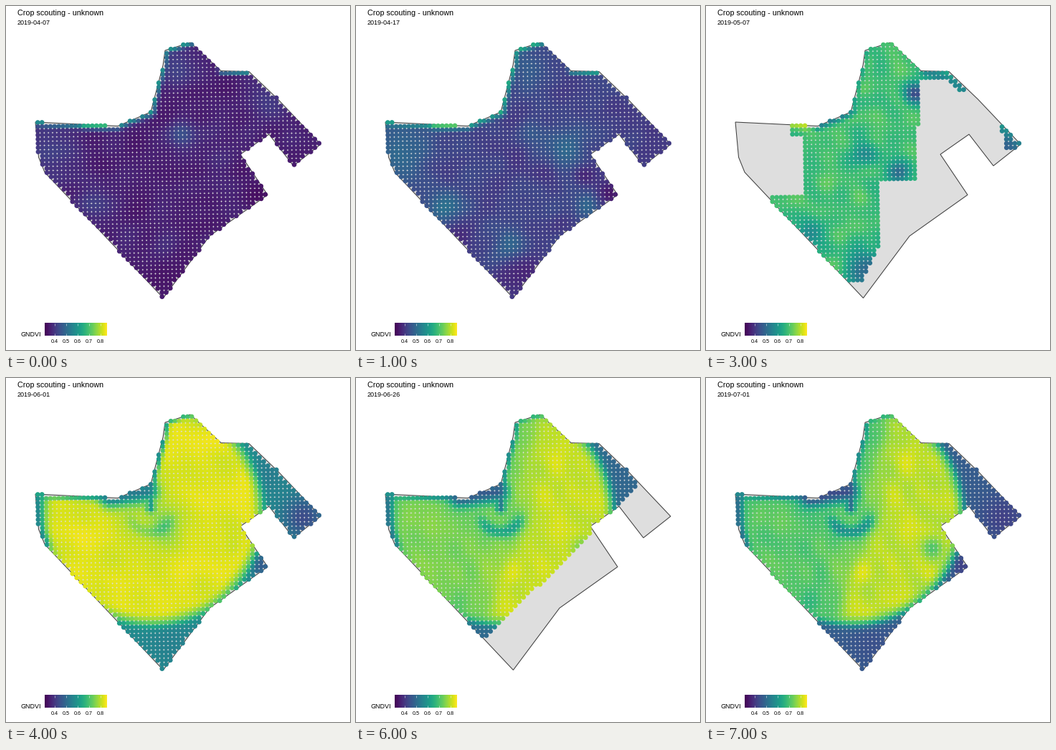
These frames come from a looping animation (480 px wide and 480 px high, 8000 ms). A matplotlib script:

```python
import numpy as np
import matplotlib.pyplot as plt
from matplotlib.animation import FuncAnimation
from matplotlib.path import Path

SIZE, DPI = 480, 80
PT = 72 / DPI
VMIN, VMAX = 0.316, 0.853
STEP, TILT = 5.85, 0.0155

FIELD = [(41, 162), (156, 167.5), (202, 148), (219, 83), (222, 62), (257, 51),
         (300, 90.5), (339, 91.5), (379.6, 130.3), (439, 193), (401, 223),
         (367, 179), (327, 207), (365, 263.5), (284, 321), (219.4, 407.5),
         (54, 232), (45.5, 211)]
NORTHWEST, LOBE, NORTHEAST = FIELD[:3], FIELD[2:6], FIELD[6:8]
WEST = [FIELD[0], FIELD[-1], FIELD[-2]]

# Spots of the field that stand out: x, y, radius.
PLACES = {
    "west": (60, 205, 42), "southwest": (122, 280, 24), "rim": (142, 320, 20),
    "south": (215, 335, 24), "tip": (232, 372, 32), "center": (222, 207, 20),
    "pond": (245, 180, 18), "ridge": (292, 200, 30), "corner": (415, 195, 30),
    "bend": (355, 260, 18), "pocket": (317, 236, 14), "lobe": (238, 85, 24),
    "northeast": (365, 135, 25), "dent": (255, 302, 15), "mouth": (292, 122, 15),
    "bay": (268, 233, 16), "bank": (322, 280, 17), "hill": (212, 274, 17),
}


def sample_points():
    """Slightly rotated square grid clipped to the field."""
    i, j = np.meshgrid(np.arange(-2, 72), np.arange(-22, 46))
    x = 44.3 + STEP * (i + TILT * j)
    y = 162.55 + STEP * (j - TILT * i)
    pts = np.column_stack([x.ravel(), y.ravel()])
    return pts[Path(FIELD).contains_points(pts)]


PTS = sample_points()
X, Y = PTS.T


def distance(line):
    best = np.full(len(PTS), np.inf)
    for a, b in zip(np.array(line[:-1], float), np.array(line[1:], float)):
        t = np.clip((PTS - a) @ (b - a) / ((b - a) @ (b - a)), 0, 1)
        best = np.minimum(best, np.hypot(*(PTS - a - t[:, None] * (b - a)).T))
    return best


def near(line, width):
    """1 on the polyline, fading to 0 away from it."""
    return np.exp(-(distance(line) / width) ** 2)


def spots(**amounts):
    total = np.zeros(len(PTS))
    for name, amount in amounts.items():
        x, y, r = PLACES[name]
        total += amount * np.exp(-((X - x) ** 2 + (Y - y) ** 2) / r ** 2)
    return total


def texture(seed, amount):
    """Smooth random mottling from a few waves."""
    rng = np.random.default_rng(seed)
    total = np.zeros(len(PTS))
    for angle, length, phase in rng.uniform((0, 30, 0), (np.pi, 90, 6.28), (12, 3)):
        along = X * np.cos(angle) + Y * np.sin(angle)
        total += np.cos(2 * np.pi * along / length + phase)
    return amount * total / np.sqrt(6)


def blend(v, target, k):
    return v + (target - v) * k


def sigmoid(u):
    return 1 / (1 + np.exp(-u))


# The irrigated circle, a rim inside it and the arc at its hub.
RADIUS = np.hypot(X - 204, Y - 190)
CIRCLE = sigmoid((155 - RADIUS) / 2.6)
RIM = 0.55 * np.exp(-((RADIUS - 151) / 8) ** 2)
ARC = np.exp(-((np.hypot(X - 202, Y - 187) - 28) / 8) ** 2) * sigmoid((Y - 196) / 4)
NOTCH = np.maximum(near([(146, 166), (198, 158)], 14),
                   0.7 * near([(202, 150), (202, 182)], 6))
GLOW = near([(110, 166), (138, 167)], 6)


def edges(v, northwest, lobe, northeast):
    v = blend(v, northwest, near(NORTHWEST, 5.5)) + 0.1 * GLOW
    v = blend(v, lobe, near(LOBE, 5))
    return blend(v, northeast, near(NORTHEAST, 4))


def early_april():
    v = 0.362 + texture(1, 0.006) + spots(
        west=0.055, southwest=0.055, pond=0.08, lobe=0.06, northeast=0.05,
        south=0.025, ridge=0.02, tip=-0.025, bend=-0.02)
    return edges(v, 0.57, 0.59, 0.62)


def late_april():
    v = 0.485 + texture(2, 0.012) + spots(
        west=0.1, southwest=0.11, south=0.11, ridge=0.11, bank=0.13, lobe=0.06,
        center=-0.07, pocket=-0.1, bend=-0.13, tip=-0.08, bay=-0.05,
        northeast=-0.06, corner=-0.05, rim=-0.07)
    return edges(v, 0.65, 0.69, 0.71)


def early_may():
    v = 0.69 + texture(3, 0.014) + spots(
        mouth=-0.24, bay=-0.2, tip=-0.22, rim=-0.15, center=-0.1, corner=-0.22)
    v = blend(v, 0.55, near(NORTHWEST[1:], 6)) + 0.1 * GLOW
    v = blend(v, 0.6, 0.7 * near(LOBE[:3], 5))
    return blend(v, 0.56, near([(310, 92), (360, 115)], 10))


def watered(crop, bare, west, northwest, lobe, notch):
    v = blend(bare, blend(crop, 0.71, RIM), CIRCLE)
    v = blend(v, west, near(WEST, 6))
    v = blend(v, northwest, near(NORTHWEST[:2], 5.5))
    v = blend(v, lobe, near(LOBE[:3], 5.5))
    v = blend(v, lobe + 0.08, 0.9 * near(LOBE[2:], 4))
    return blend(v, notch, NOTCH)


def early_june():
    crop = 0.828 + texture(4, 0.006) - 0.05 * ARC + spots(center=-0.06, pocket=-0.02)
    crop -= 0.04 * np.exp(-((X - 200) ** 2 + (Y - 195) ** 2) / 50 ** 2)
    bare = 0.57 + spots(corner=-0.13, bend=-0.1, northeast=-0.03, tip=-0.02)
    return watered(crop, bare, 0.57, 0.63, 0.58, 0.54)


def mid_june():
    crop = 0.775 + texture(5, 0.006) + spots(
        dent=-0.22, pocket=-0.02, lobe=-0.08, south=-0.02)
    bare = 0.585 + spots(corner=-0.13, bend=-0.14, tip=-0.03)
    return blend(bare, blend(crop, 0.71, RIM), CIRCLE)


def early_july():
    crop = 0.71 + 0.09 * sigmoid((X - 222 - 0.25 * (200 - Y)) / 10)
    crop += texture(6, 0.01) - 0.13 * ARC + spots(
        hill=0.06, pocket=-0.08, center=-0.05, rim=-0.04, south=0.02)
    bare = 0.47 + spots(corner=-0.05, bend=-0.05, tip=-0.02)
    return watered(crop, bare, 0.52, 0.57, 0.58, 0.44)


def may_clear():
    left = np.where(Y < 182, 117, np.where(Y < 262, 136, 0))
    right = np.where(Y < 243, 296, 243 - 0.5 * np.clip(Y - 335, 0, None))
    body = (X > left) & (X < right) & (Y < 387)
    strip = distance([(300, 94), (338, 95), (359, 114)]) < 7
    corner = distance([(419, 172), (426, 196), (437, 191)]) < 7
    return body | strip | corner


def june_clear():
    left = 241 - 0.75 * np.clip(Y - 228, 0, None)
    top = 145 + 0.53 * np.clip(X - 262, 0, None)
    body = ((X > left) & (Y > top)) | (Y > 304)
    trail = distance([(222, 66), (237, 64), (248, 88)]) < 5
    corner = (X > 373) & (Y > np.where(X > 416, 172, 186))
    return body | trail | corner


CLEAR = np.ones(len(PTS), bool)
SCENES = [
    ("2019-04-07", early_april(), CLEAR),
    ("2019-04-17", blend(early_april(), late_april(), 0.5), CLEAR),
    ("2019-04-27", late_april(), CLEAR),
    ("2019-05-07", early_may(), may_clear()),
    ("2019-06-01", early_june(), CLEAR),
    ("2019-06-16", mid_june(), june_clear()),
    ("2019-06-26", blend(early_june(), early_july(), 0.7), X + Y < 545),
    ("2019-07-01", early_july(), CLEAR),
]

plt.rcParams["font.family"] = "Liberation Sans"
fig = plt.figure(figsize=(SIZE / DPI, SIZE / DPI), dpi=DPI, facecolor="white")
ax = fig.add_axes([0, 0, 1, 1])


def label(x, y, text, px, **kw):
    return ax.text(x, y, text, fontsize=px * PT, va="baseline", color="black", **kw)


ax.add_patch(plt.Polygon(FIELD, facecolor="#dedede", edgecolor="#404040",
                         linewidth=1.05 * PT, zorder=1))
dots = ax.scatter(X, Y, c=SCENES[0][1], s=(6.7 * PT) ** 2, linewidths=0,
                  cmap="viridis", vmin=VMIN, vmax=VMAX, zorder=2)

label(16, 12.8, "Crop scouting - unknown", 10.8)
date = label(16, 26, "", 9)
label(20.4, 460.8, "GNDVI", 9)
ax.imshow(np.linspace(0, 1, 256)[None], cmap="viridis", aspect="auto",
          extent=(53.8, 140, 460, 442.9), zorder=2)
for k in range(5):
    x = 67.7 + 16.05 * k
    for top in (442.9, 456.6):
        ax.plot([x, x], [top, top + 3.4], color="white", lw=0.5 * PT, zorder=3,
                solid_capstyle="butt")
    label(x, 470.3, f"{0.4 + k / 10:.1f}", 7.2, ha="center")

ax.set_xlim(0, SIZE)
ax.set_ylim(SIZE, 0)
ax.axis("off")


def draw(n):
    day, values, clear = SCENES[n % len(SCENES)]
    date.set_text(day)
    dots.set_offsets(PTS[clear])
    dots.set_array(values[clear])
    return dots, date


anim = FuncAnimation(fig, draw, frames=len(SCENES), interval=1000, repeat=True,
                     repeat_delay=0)
plt.show()
```
